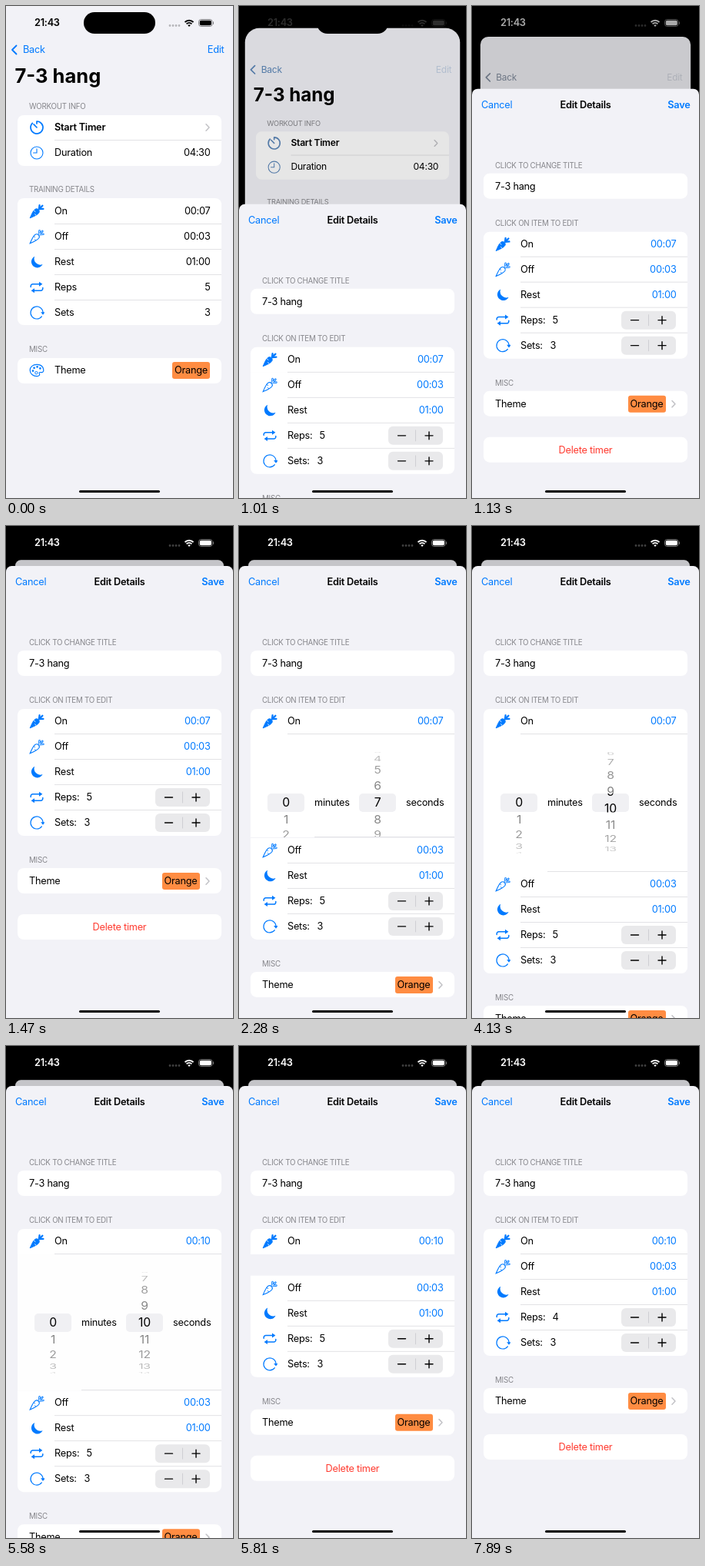
These frames come from a looping animation (295x640 px, 8000 ms). An HTML page:

```html
<!DOCTYPE html>
<html lang="en">
<head>
<meta charset="utf-8">
<title>Interval timer editor</title>
<style>
  html, body { margin: 0; width: 100%; height: 100%; overflow: hidden; background: #000; }
  #stage { position: relative; width: 295px; height: 640px; overflow: hidden; background: #000;
    font: 400 12.75px/16px Inter, "Liberation Sans", sans-serif; letter-spacing: -.02em; color: #000; }
  #stage div, #stage svg, .t { position: absolute; }
  .screen { left: 0; width: 295px; height: 640px; overflow: hidden; background: #f2f2f7; --tint: #007aff; }
  #main { top: 0; transform-origin: 50% 0; }
  #dim { inset: 0; background: #000; }
  #sheet { top: 52px; border-radius: 7.5px 7.5px 0 0; }
  #low { left: 0; top: 0; width: 295px; height: 640px; }
  .t { white-space: nowrap; }
  .mid { transform: translateX(-50%); }
  .bold { font-weight: 600; }
  .tint { color: var(--tint); }
  .red { color: #ff3b30; }
  .head { font-size: 9.75px; color: #86868b; }
  .title { font-size: 25.5px; font-weight: 700; letter-spacing: 0; }
  .pill { padding: 3px; margin-top: -3px; border-radius: 3px; background: #ff8c42; }
  .box { left: 15px; width: 265px; background: #fff; border-radius: 8px; }
  .line { height: 1px; background: #e2e2e5; }
  .icon { left: 30px; width: 20px; height: 20px; overflow: visible; color: var(--tint); }
  .chev { left: 259px; width: 6px; height: 10px; fill: none; stroke: #c2c2c6; stroke-width: 1.5;
    stroke-linecap: round; stroke-linejoin: round; }
  .step { left: 194px; width: 71px; height: 24px; border-radius: 6px; background: #e9e9eb; overflow: hidden; }
  #press { left: 0; top: 0; width: 35px; height: 24px; background: #d6d6da; }
  .step svg { left: 0; top: 0; fill: none; stroke: #000; stroke-width: 1.4; stroke-linecap: round; }
  #picker { left: 15px; top: 218.5px; width: 265px; background: #fff; overflow: hidden; }
  .reel { width: 48px; height: 132px; top: 23.5px; overflow: hidden; }
  .slot { width: 48px; height: 24px; top: 77.5px; border-radius: 5px; background: #f0f0f3; overflow: hidden; }
  .reel span, .slot span { position: absolute; left: 0; width: 48px; top: 50%; margin-top: -10px;
    font-size: 15.75px; line-height: 20px; text-align: center; }
  #status { left: 0; top: 0; width: 295px; height: 40px; }
  #status svg { left: 0; top: 0; }
  #island { left: 101px; top: 8px; width: 93px; height: 28px; border-radius: 14px; background: #000; }
  #home { left: 95.3px; top: 629.7px; width: 104.4px; height: 3.8px; border-radius: 2px; background: #000; }
</style>
</head>
<body>
<svg width="0" height="0" style="position:absolute">
  <defs>
    <symbol id="timer" viewBox="0 0 20 20">
      <path d="M10 5V2A8 8 0 1 1 4.3 4.4M10 10 6 5.8" fill="none" stroke="currentColor" stroke-width="1.7" stroke-linecap="round" stroke-linejoin="round"/>
    </symbol>
    <symbol id="clock" viewBox="0 0 20 20">
      <path d="M10 4.8V10H5.6M18 10A8 8 0 1 1 2 10A8 8 0 1 1 18 10Z" fill="none" stroke="currentColor" stroke-width="1.1" stroke-linecap="round"/>
    </symbol>
    <path id="root" d="M1.2 18.8C3.4 14 5.4 8.4 8.6 7C11.4 6 14.2 9 13 11.6C11.4 14.6 6.4 16.6 1.2 18.8Z"/>
    <path id="leaves" d="M13 7.2 13.6 2.2M13 7.2 17.4 2.8M13 7.2 18.4 6.8" fill="none" stroke-linecap="round"/>
    <symbol id="carrot" viewBox="0 0 20 20">
      <use href="#root" fill="currentColor" stroke="currentColor"/>
      <use href="#leaves" stroke="currentColor" stroke-width="2.3"/>
      <path d="M6.2 9 8.4 10.8M9 15.2 7.2 13.4" stroke="#fff" stroke-width=".9"/>
    </symbol>
    <symbol id="carrotLine" viewBox="0 0 20 20">
      <use href="#leaves" stroke="currentColor" stroke-width="2.6"/>
      <use href="#leaves" stroke="#fff" stroke-width=".8"/>
      <use href="#root" fill="#fff" stroke="currentColor" stroke-width="1.1"/>
      <path d="M6.2 9.6 7.6 10.8M8.6 14.8 7.4 13.6" stroke="currentColor" stroke-linecap="round"/>
    </symbol>
    <symbol id="moon" viewBox="0 0 20 20">
      <path d="M7.2 2.8A7.7 7.7 0 1 0 17.6 13A7.9 7.9 0 0 1 7.2 2.8Z" fill="currentColor"/>
    </symbol>
    <symbol id="repeat" viewBox="0 0 20 20">
      <g id="hook"><path d="M2.2 9.4V8.4A2.6 2.6 0 0 1 4.8 5.8H13.5" fill="none" stroke="currentColor" stroke-width="1.5" stroke-linecap="round"/>
      <path d="M13 2.8 17.4 5.8 13 8.8Z" fill="currentColor"/></g>
      <use href="#hook" transform="rotate(180 10 10)"/>
    </symbol>
    <symbol id="cycle" viewBox="0 0 20 20">
      <path d="M16.4 14.8A8 8 0 1 1 18 10" fill="none" stroke="currentColor" stroke-width="1.2" stroke-linecap="round"/>
      <path d="M15.2 9.2H20.6L18 12.8Z" fill="currentColor"/>
    </symbol>
    <symbol id="palette" viewBox="0 0 20 20">
      <path d="M10.4 2.4C5 2.2 1.2 5.4 1.2 9.8C1.2 14.6 5.4 17.6 10.2 17.6C13 17.6 14.2 16.2 13.4 14.6C12.6 12.8 13.8 12.2 15.6 12.6C17.8 13 19 11.6 18.8 9.2C18.4 5.2 15 2.6 10.4 2.4Z" fill="none" stroke="currentColor" stroke-width="1.2"/>
      <path d="M5 10.6h0M6.6 6.8h0M10.6 5.4h0M14.4 7.4h0" stroke="currentColor" stroke-width="2.7" stroke-linecap="round"/>
      <circle cx="9.4" cy="13.2" r="1.7" fill="none" stroke="currentColor"/>
    </symbol>
  </defs>
</svg>

<div id="stage">
  <div id="main" class="screen"></div>
  <div id="sheet" class="screen"></div>
  <div id="island"></div>
  <div id="status">
    <span class="t bold" style="left:37px;top:14px">21:43</span>
    <svg width="295" height="40" fill="none" stroke="currentColor">
      <path d="M213 25.5h0m4 0h0m4 0h0m4 0h0" stroke-width="2.8" stroke-linecap="round" opacity=".25"/>
      <path d="M232.5 21A7.8 7.8 0 0 1 243.5 21M234.6 23.3A4.8 4.8 0 0 1 241.4 23.3" stroke-width="1.9"/>
      <path d="M236.2 25A2.6 2.6 0 0 1 239.8 25L238 27Z" fill="currentColor" stroke="none"/>
      <rect x="250.5" y="17.5" width="17.5" height="9" rx="3" opacity=".45"/>
      <rect x="251.8" y="18.8" width="15" height="6.4" rx="1.8" fill="currentColor" stroke="none"/>
      <path d="M269.5 20.8v2.6" opacity=".45" stroke-linecap="round"/>
    </svg>
  </div>
  <div id="home"></div>
</div>

<script>
const $ = id => document.getElementById(id);

// Builders take the vertical centre of what they place.
const span = (s, y, cls, side) => `<span class="t ${cls}" style="top:${y - 8}px;${side}">${s}</span>`;
const text = (s, x, y, cls = '') => span(s, y, cls, `left:${x}px`);
const right = (s, x, y, cls = '') => span(s, y, cls, `right:${295 - x}px`);
const head = (s, y) => text(s, 30, y, 'head');
const box = (y, rows, radius = '8px') =>
  `<div class="box" style="top:${y}px;height:${rows * 33}px;border-radius:${radius}"></div>`;
const line = y => `<div class="line" style="top:${y - .5}px;left:63px;width:217px"></div>`;
const lines = (...ys) => ys.map(line).join('');
const icon = (id, y) => `<svg class="icon" style="top:${y - 10}px"><use href="#${id}"/></svg>`;
const chevron = y => `<svg class="chev" style="top:${y - 5}px"><path d="M1 .8 5 5 1 9.2"/></svg>`;
const row = (id, label, y, cls) => icon(id, y) + text(label, 63, y, cls);
const stepper = (y, press = '') => `<div class="step" style="top:${y - 12}px">${press}
  <svg width="71" height="24"><path d="M12.5 12h10M48 12h10M53 7v10"/><path d="M35.5 5v14" stroke="#cfcfd3" stroke-width="1"/></svg></div>`;
const wheel = (name, x) =>
  `<div class="reel" id="${name}Reel" style="left:${x}px"></div><div class="slot" id="${name}Slot" style="left:${x}px"></div>`;

$('main').innerHTML =
  `<svg width="20" height="80" fill="none" stroke="var(--tint)" stroke-width="1.8" stroke-linecap="round" stroke-linejoin="round"><path d="M13.5 51.5 8 57l5.5 5.5"/></svg>` +
  text('Back', 22, 57, 'tint') + right('<span id="edit">Edit</span>', 283.5, 57, 'tint') +
  text('7-3 hang', 11.5, 91, 'title') +
  head('WORKOUT INFO', 131) + box(141.5, 2) + line(174.5) +
  row('timer', 'Start Timer', 158, 'bold') + chevron(158) +
  row('clock', 'Duration', 191) + right('04:30', 265.5, 191) +
  head('TRAINING DETAILS', 239) + box(250, 5) + lines(283, 316, 349, 382) +
  [['carrot', 'On', '00:07'], ['carrotLine', 'Off', '00:03'], ['moon', 'Rest', '01:00'],
   ['repeat', 'Reps', '5'], ['cycle', 'Sets', '3']]
    .map(([id, label, value], i) => row(id, label, 267 + 33 * i) + right(value, 265.5, 267 + 33 * i)).join('') +
  head('MISC', 447) + box(457.5, 1) + row('palette', 'Theme', 474) + right('Orange', 265, 474, 'pill') +
  '<div id="dim"></div>';

$('sheet').innerHTML =
  text('Cancel', 12, 21, 'tint') + text('Edit Details', 147.5, 21, 'bold mid') + right('Save', 283.5, 21, 'tint bold') +
  head('CLICK TO CHANGE TITLE', 99.5) + box(110, 1) + text('7-3 hang', 30, 127) +
  head('CLICK ON ITEM TO EDIT', 175) + box(185.5, 1, '8px 8px 0 0') +
  row('carrot', 'On', 202) + right('<span id="on"></span>', 265.5, 202, 'tint') +
  `<div id="picker">${wheel('min', 22)}${wheel('sec', 141)}
    ${text('minutes', 83, 89.5)}${text('seconds', 202, 89.5)}
    <div class="line" style="left:83px;right:0;bottom:0"></div></div>` +
  `<div id="low">${box(218.5, 4, '0 0 8px 8px')}${lines(251.5, 284.5, 317.5)}
    ${row('carrotLine', 'Off', 235)}${right('00:03', 265.5, 235, 'tint')}
    ${row('moon', 'Rest', 268)}${right('01:00', 265.5, 268, 'tint')}
    ${row('repeat', 'Reps:', 301)}${text('<span id="reps"></span>', 104.5, 301)}
    ${stepper(301, '<div id="press"></div>')}
    ${row('cycle', 'Sets:', 334)}${text('3', 101.5, 334)}${stepper(334)}
    ${head('MISC', 382.5)}${box(393, 1)}${text('Theme', 30, 410)}
    ${right('Orange', 251.5, 410, 'pill')}${chevron(409.5)}
    ${box(452.5, 1)}${text('Delete timer', 147.5, 469.5, 'red mid')}</div>` +
  `<div id="rule">${line(218.5)}</div>`;

const LOOP = 8000, OPEN = 179;
// The screen only refreshes at these moments; the pose holds between them.
const beats = [0, 500, 890, 1010, 1130, 1240, 1360, 1470, 2070, 2180, 2280, 2390, 3410, 3540, 3650, 3760,
  3910, 4020, 4130, 4350, 4450, 5580, 5700, 5810, 7680, 7790, 7890];

const unit = (t, from, ms) => Math.min(1, Math.max(0, (t - from) / ms));
const smooth = u => u * u * (3 - 2 * u);
const mix = (a, b, p) => a + (b - a) * p;

function spring(ms) {
  const w = Math.max(0, ms) * .0145;
  const p = 1 - (1 + w) * Math.exp(-w);
  return p > .998 ? 1 : p;
}

// Numbers sit on a drum of radius 68 px, 19 degrees apart.
function turn(name, value) {
  let faded = '', solid = '';
  for (let n = Math.max(0, Math.ceil(value - 4)); n <= value + 4; n++) {
    const a = (n - value) * 19 * Math.PI / 180, c = Math.cos(a);
    const pose = `transform:translateY(${68 * Math.sin(a)}px) scaleY(${c})`;
    faded += `<span style="${pose};opacity:${.5 * c}">${n}</span>`;
    solid += `<span style="${pose}">${n}</span>`;
  }
  $(name + 'Reel').innerHTML = faded;
  $(name + 'Slot').innerHTML = solid;
}

function pose(t) {
  const p = spring(t - 857);
  const main = $('main').style;
  main.transform = `translateY(${44.3 * p}px) scale(${1 - .0814 * p})`;
  main.borderRadius = p > 0 ? mix(41, 8, p) + 'px' : 0;
  main.setProperty('--tint', `color-mix(in srgb, #007aff, #8e8e93 ${p * 100}%)`);
  $('edit').style.opacity = t >= 500 ? .3 : 1;
  $('dim').style.opacity = .19 * p ** 1.5;
  $('sheet').style.transform = `translateY(${588 * (1 - p)}px)`;
  const g = 255 * p ** 4;
  $('status').style.color = `rgb(${g},${g},${g})`;

  const shut = smooth(unit(t, 5560, 333));
  const gap = OPEN * (smooth(unit(t, 2050, 340)) - shut);
  const fade = Math.max(0, 1 - 1.25 * shut);
  $('low').style.transform = `translateY(${gap}px)`;
  $('picker').style.height = gap + 'px';
  $('picker').style.opacity = fade;
  $('rule').style.opacity = shut < 1 ? fade : 1;
  turn('min', 0);
  turn('sec', 10 - 3 * (1 - unit(t, 3410, 1040)) ** 1.8);

  $('on').textContent = t < 5580 ? '00:07' : '00:10';
  $('reps').textContent = t < 7790 ? 5 : 4;
  $('press').style.opacity = t >= 7680 && t < 7890 ? 1 : 0;
}

let shown = -1;
function tick() {
  const now = performance.now() % LOOP;
  const beat = beats.findLast(b => b <= now);
  if (beat !== shown) pose(shown = beat);
  requestAnimationFrame(tick);
}
tick();
</script>
</body>
</html>
```
